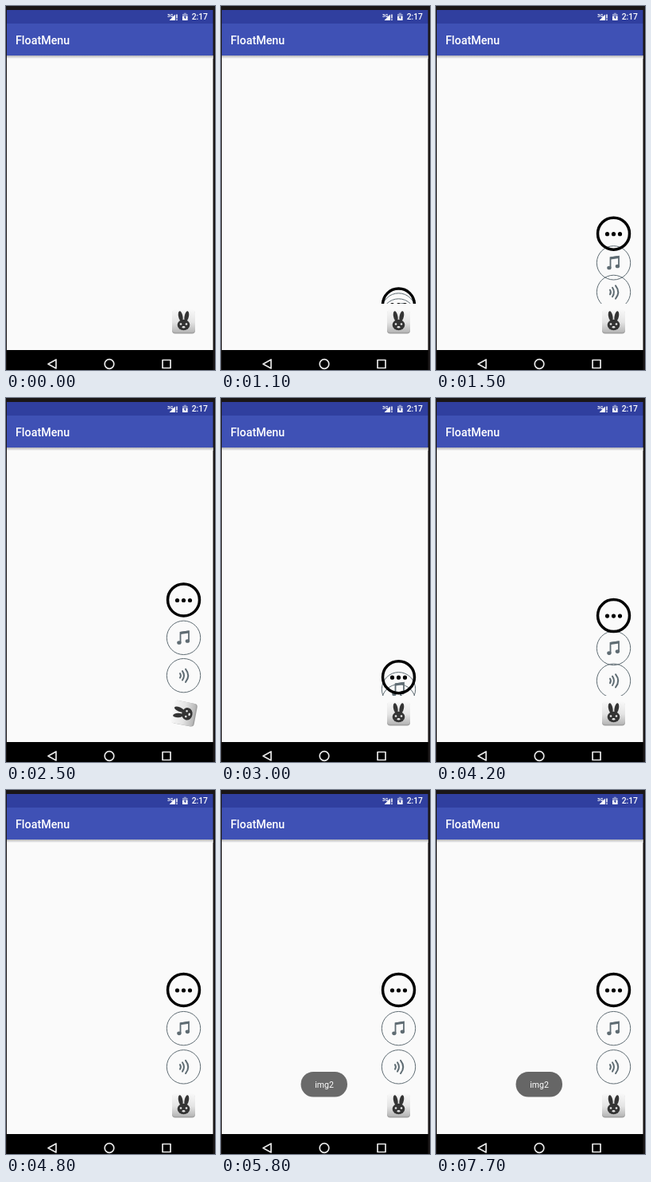
An HTML page that plays this animation: 263x456 px, repeating every 8000 ms.

```html
<!DOCTYPE html>
<html lang="en">
<head>
<meta charset="utf-8">
<title>FloatMenu</title>
<style>
  html, body { margin: 0; width: 100%; height: 100%; overflow: hidden; background: #1a1617; }
  svg { display: block; width: 263px; height: 456px; }
  text { font-family: Roboto, sans-serif; fill: #fff; }
</style>
</head>
<body>
<svg viewBox="0 0 263 456">
  <defs>
    <linearGradient id="shade" x2="0" y2="1">
      <stop stop-color="#b4b4b6"/><stop offset="1" stop-color="#fafafa"/>
    </linearGradient>
    <linearGradient id="key" x2="0" y2="1">
      <stop stop-color="#f8f8f8"/><stop offset=".55" stop-color="#e4e4e4"/><stop offset="1" stop-color="#b5b5b5"/>
    </linearGradient>
    <clipPath id="tray"><path d="M190 200h70v173h-70z"/></clipPath>
  </defs>

  <path fill="#fafafa" d="M1 62h259.5v369H1z"/>
  <path fill="url(#shade)" d="M1 62h259.5v4H1z"/>
  <path fill="#303f9f" d="M1 5h259.5v17H1z"/>
  <path fill="#3f51b5" d="M1 22h259.5v40H1z"/>
  <path d="M1 431h259.5v25H1z"/>

  <!-- status bar and title -->
  <text x="203" y="14" font-size="6" font-weight="700">3G</text>
  <path fill="#fff" d="M205.500 18 213 10.500V18zM214.200 10.500h1.500v5h-1.500zM214.200 16.500h1.500V18h-1.500z"/>
  <path fill="#8f98cc" d="M222 10h1.800V8.800h3V10h1.800v3.500H222z"/>
  <path fill="#fff" d="M222 13h6.600v5H222z"/>
  <path fill="#303f9f" d="M225.800 11.500 223.700 14.700h1.300V17l2-3.200h-1.200z"/>
  <text x="233.700" y="17.300" font-size="10.300" font-weight="500">2:17</text>
  <text x="12" y="47.500" font-size="14.300" font-weight="500">FloatMenu</text>

  <!-- navigation -->
  <g fill="none" stroke="#e8e8e8" stroke-width="1.700" stroke-linejoin="round">
    <path d="M53 448.500 63 443v11z"/>
    <circle cx="130" cy="448.500" r="5.800"/>
    <path d="M197 443.500h10v10h-10z"/>
  </g>

  <g id="menu" clip-path="url(#tray)" fill="none" stroke="#5f6c73">
    <g class="item">
      <circle r="21.200" stroke-width="1"/>
      <g stroke-width="2" stroke-linecap="round">
        <path d="M2.500-2.700Q4.300 0 2.500 2.900" transform="translate(-7)"/>
        <path d="M-1.500-5.600Q2.400 0-1.500 5.800"/>
        <path d="M2.500-8Q9 .200 2.500 8.200"/>
      </g>
    </g>
    <g class="item">
      <circle r="21.200" stroke-width="1"/>
      <path d="M-4 6V-6.500L6.500-8V4" stroke-width="1.800"/>
      <path d="M-4-5.800 6.500-7.300" stroke-width="3"/>
      <g fill="#5f6c73" stroke="none">
        <ellipse cx="-5.600" cy="6.200" rx="2.700" ry="2.300"/>
        <ellipse cx="4.900" cy="4.200" rx="2.700" ry="2.300"/>
      </g>
    </g>
    <g class="item" stroke="#000">
      <circle r="20" stroke-width="3.500"/>
      <path d="M-8 .500h0M0 .500h0M8 .500h0" stroke-width="5.200" stroke-linecap="round"/>
    </g>
  </g>

  <g id="button">
    <rect x="-14.500" y="-13.500" width="29" height="29" rx="4" fill="#a0a0a0"/>
    <rect x="-14.500" y="-14.500" width="29" height="28.500" rx="4" fill="url(#key)"/>
    <g fill="#343434">
      <ellipse cx="-3.800" cy="-6.300" rx="2.700" ry="6.500" transform="rotate(-12 -3.800 -6.300)"/>
      <ellipse cx="3.800" cy="-6.300" rx="2.700" ry="6.500" transform="rotate(12 3.800 -6.300)"/>
      <ellipse cy="4.500" rx="7.800" ry="6.700"/>
    </g>
    <g fill="#e8e8e8">
      <circle cx="-3.500" cy="3.500" r="1.300"/>
      <circle cx="3.500" cy="3.500" r="1.300"/>
      <ellipse cy="7.300" rx="1.900" ry="1.300"/>
    </g>
  </g>

  <g id="toast">
    <rect x="100.500" y="353" width="58.500" height="31.500" rx="15.700" fill="#666"/>
    <text x="130" y="373" font-size="10.500" text-anchor="middle">img2</text>
  </g>
</svg>
<script>
const LOOP = 8000, STEP = 100, GAP = 48.17;
const taps = [
  { at: 992, opens: true },
  { at: 2422, opens: false },
  { at: 3870, opens: true }
];
const $ = id => document.getElementById(id);
const items = document.querySelectorAll('.item');
const clamp = x => Math.min(1, Math.max(0, x));
const smooth = x => (1 - Math.cos(Math.PI * x)) / 2;

function bounce(x) {
  if (x >= 1) return 1;
  x *= 1.1226;
  const hop = (mid, low) => 8 * (x - mid) ** 2 + low;
  if (x < .3535) return hop(0, 0);
  if (x < .7408) return hop(.54719, .7);
  if (x < .9644) return hop(.8526, .9);
  return hop(1.0435, .95);
}

function draw(t) {
  const tap = taps.findLast(p => p.at <= t);
  const age = tap ? t - tap.at : 0;
  const spread = !tap ? 0
    : tap.opens ? bounce(age / 900)
    : 1 - smooth(clamp(age / 930));

  $('menu').style.display = spread > 0 ? '' : 'none';
  items.forEach((item, i) =>
    item.setAttribute('transform', `translate(223.5 ${395 - GAP * (i + 1) * spread})`));

  const turn = 360 * clamp(age / 100);
  $('button').setAttribute('transform', `translate(223.5 395) rotate(${turn})`);

  const fade = clamp((t - 5470) / 400);
  $('toast').setAttribute('opacity', 1 - (1 - fade) ** 2);
}

const start = performance.now();
function tick() {
  const t = (performance.now() - start) % LOOP;
  draw(Math.floor(t / STEP) * STEP);
  requestAnimationFrame(tick);
}
tick();
</script>
</body>
</html>
```
